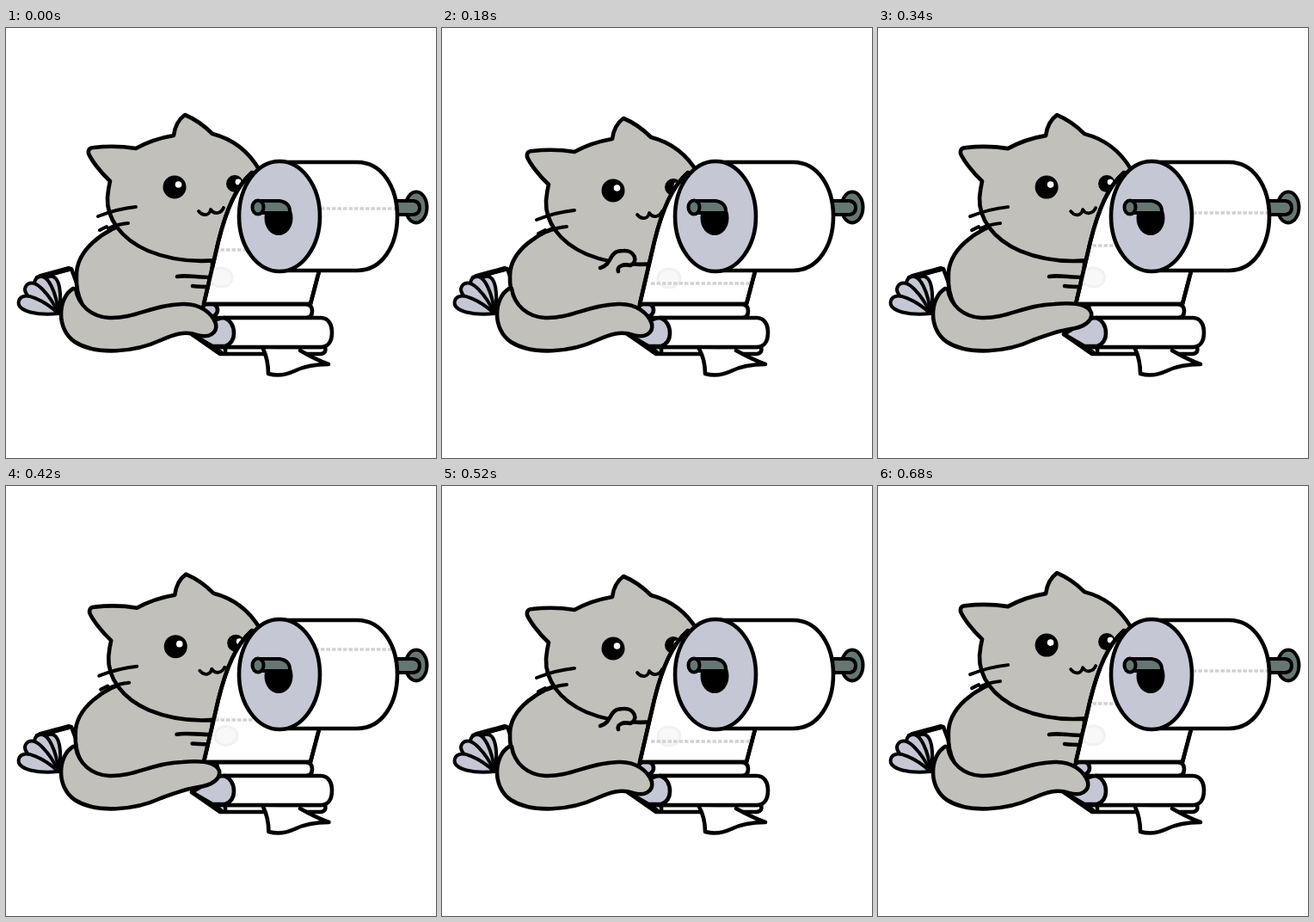
An HTML page for the animation above (0.7 s loop, 500 by 500 pixels).

```html
<!DOCTYPE html>
<html lang="en">
<head>
<meta charset="utf-8">
<title>Cat unrolling paper</title>
<style>
  html, body { margin: 0; height: 100%; overflow: hidden; background: #fff; }
  svg { display: block; width: 100%; height: 100%; stroke: #000; stroke-width: 4.6;
        stroke-linecap: round; stroke-linejoin: round; fill: none; }
  .fur { fill: #c2c0ba; }
  .paper { fill: #fff; }
  .end { fill: #c5c7d4; }
  .metal { fill: #667672; stroke-width: 4; }
  .dot { fill: #000; stroke: none; }
  .shine { fill: #fff; stroke: none; }
  .perf { stroke: #d2d2d2; stroke-width: 3.4; stroke-dasharray: 4.5 2; stroke-linecap: butt; }
  .faint { fill: #f8f8f9; stroke: #f1f1f3; stroke-width: 3; }
  .bare { stroke: none; }
</style>
</head>
<body>
<svg viewBox="0 0 500 500">
  <defs>
    <path id="sheetShape" d="M286 168C267 185 256 212 247 248L230 321H354L364 283L330 200Z"/>
    <path id="rollShape" d="M318 156H408C438 156 455 186 455 219C455 252 438 282 408 282H318Z"/>
    <clipPath id="sheetClip"><use href="#sheetShape"/></clipPath>
    <clipPath id="rollClip"><use href="#rollShape"/></clipPath>
  </defs>

  <!-- folded paper behind the cat -->
  <path class="paper" d="M36 290L76 280L95 331H62Z"/>
  <path d="M40 289L73 280" stroke-width="6"/>
  <g class="end" id="fan"></g>

  <path class="fur" id="body"/>
  <g id="head">
    <path class="fur" d="M121 178C109 167 99 153 96 146Q95 139 102 139Q127 136 151 140Q171 129 195 125Q197 109 208 101Q225 108 240 123Q275 132 294 164L300 240L245 270Q201 274 165 259C133 245 117 221 118 197Q119 186 121 178Z"/>
    <path d="M107 219Q130 210 151 208M109 235L117 231M119 233Q130 228 142 227" stroke-width="4"/>
    <circle class="dot" cx="196" cy="185" r="13.5"/>
    <circle class="shine" cx="200.500" cy="182" r="3.8"/>
    <circle class="dot" cx="266" cy="181" r="10"/>
    <circle class="shine" cx="270" cy="179" r="3.4"/>
    <path d="M224 213Q228 218 233 217Q237 216 238 211Q241 216 246 215Q251 214 253 209" stroke-width="3.8"/>
  </g>
  <path class="fur" id="arm"/>

  <!-- paper heap -->
  <path class="paper" d="M216 356L249 379H366Q373 378 371 371H245"/>
  <path d="M228 362L250 377M255 373V378"/>
  <path class="paper" id="flap"/>
  <path class="paper" d="M236 321H349Q356 322 356 329Q356 337 349 337H240Z"/>
  <ellipse class="end" cx="237" cy="328" rx="9" ry="8"/>
  <path class="paper" d="M253 337H366C375 337 379 345 379 354C379 364 375 371 366 371H248Z"/>
  <path class="end" d="M216 356L238 343Q246 337 254 337Q265 342 265 355Q265 366 255 370H240Z"/>

  <use href="#sheetShape" class="paper"/>
  <g clip-path="url(#sheetClip)">
    <ellipse class="faint" id="pad" cx="250" cy="290" rx="13" ry="11"/>
    <path class="perf" id="perfNew" d="M243 0H364"/>
    <path class="perf" id="perfOld" d="M238 0H364"/>
  </g>
  <use href="#sheetShape"/>

  <!-- roll and holder -->
  <ellipse class="metal" cx="477" cy="208.500" rx="12.500" ry="18"/>
  <path class="metal" d="M452 201H474Q481 202 481 209Q481 216 474 217H452Z"/>
  <use href="#rollShape" class="paper bare"/>
  <g class="perf" clip-path="url(#rollClip)"><path id="perfRoll" d="M340 0H460"/></g>
  <use href="#rollShape"/>
  <ellipse class="end" cx="318" cy="219" rx="47" ry="64"/>
  <ellipse class="dot" cx="317" cy="221" rx="16.500" ry="20"/>
  <path class="metal" d="M293 201H318Q331 203 330 215H293Z" stroke-width="3.5"/>
  <ellipse class="metal" cx="293" cy="208.500" rx="6.500" ry="8" stroke-width="3.5"/>

  <path class="fur" id="tail"/>
</svg>
<script>
const el = id => document.getElementById(id);
const clamp = x => Math.max(0, Math.min(1, x));
const smooth = x => (x = clamp(x)) * x * (3 - 2 * x);

// Blend two paths that share the same commands.
function blend(a, b, k) {
  const goal = b.match(/-?\d+/g);
  let i = 0;
  return a.replace(/-?\d+/g, n => (+n + (goal[i++] - n) * k).toFixed(2));
}

// Piecewise linear track through [time, value] points.
function track(points, x) {
  let i = 1;
  while (i < points.length - 1 && points[i][0] < x) i++;
  const [x0, y0] = points[i - 1], [x1, y1] = points[i];
  return y0 + (y1 - y0) * (x - x0) / (x1 - x0);
}

const shapes = {
  body: ["M150 224C112 234 81 259 82 289C81 311 90 331 110 346L240 340V252",
         "M150 226C112 236 79 259 79 288C78 311 88 331 110 346L240 340V252"],
  arm: ["M199 289C210 287 222 290 240 290C250 290 250 301 240 301C232 301 225 301 217 300",
        "M184 279C200 274 192 259 211 259C224 258 229 272 219 276C211 274 203 277 205 283"],
  tail: ["M78 303C60 314 58 350 80 365C105 381 150 377 180 363C196 356 208 352 222 357C236 361 246 355 244 344C240 332 226 320 205 321C170 322 150 338 120 337C100 336 84 323 81 303",
         "M78 303C60 314 58 350 80 365C105 381 150 377 180 363C196 357 210 352 224 350C240 348 250 340 248 331C244 321 226 319 205 321C170 322 150 338 120 337C100 336 84 323 81 303"],
  flap: ["M299 373Q305 386 305 402Q320 406 335 399Q351 391 375 391Q359 385 342 375",
         "M299 373Q306 386 306 402Q321 406 336 399Q352 391 376 391Q360 385 342 375"]
};
const sheetTrack = [[10, 165], [17, 253], [18, 258], [22, 272], [27, 297], [31, 330]];
const rollTrack = [[10, 285], [17, 215], [18, 210], [22, 190], [26, 152]];

el("fan").innerHTML = [[50, 289], [37, 290], [24, 299], [15, 317]].map(([x, y]) => {
  const dx = x - 61, dy = y - 332, len = Math.hypot(dx, dy);
  const turn = Math.atan2(dy, dx) * 180 / Math.PI;
  return `<path transform="translate(61 332) rotate(${turn})" stroke-width="4"
    d="M0 0C${len * .4} -9 ${len} -14 ${len} 0C${len} 14 ${len * .4} 9 0 0Z"/>`;
}).join("");

function move(id, x, y) {
  el(id).setAttribute("transform", `translate(${x} ${y})`);
}

function draw(now) {
  const step = Math.floor(now % 700 / 20);
  const pose = step < 18 ? step : step - 17; // second pull skips its first pose
  const lean = Math.sin(Math.PI * pose / 18) ** 2;
  const lift = smooth((step - 11) / 5) - smooth((step - 21) / 4);
  const pull = pose < 10 ? pose + 18 : pose;

  move("head", 3 * lean, 4 * lean);
  move("pad", 14 * lean, lean);
  const amounts = { body: lean, arm: lean ** 4, tail: lift, flap: lean };
  for (const id in shapes) el(id).setAttribute("d", blend(...shapes[id], amounts[id]));
  move("perfNew", 0, track(sheetTrack, pull));
  move("perfOld", 0, track(sheetTrack, pull + 18));
  move("perfRoll", 0, track(rollTrack, pull));
  requestAnimationFrame(draw);
}
requestAnimationFrame(draw);
</script>
</body>
</html>
```
